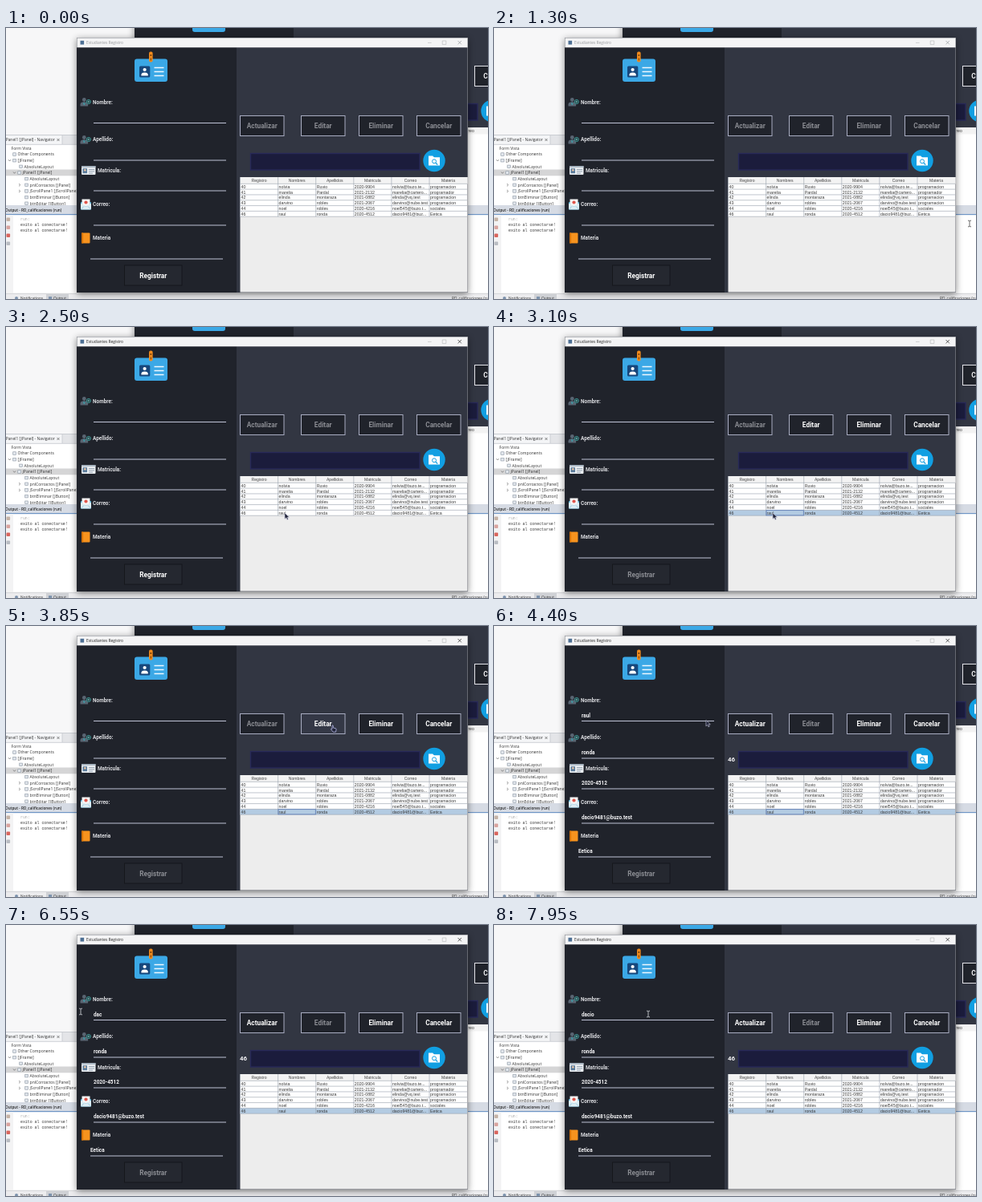
An HTML page for the animation above (8000 ms loop, 600 px wide and 338 px high).

```html
<!DOCTYPE html>
<html lang="es">
<head>
<meta charset="utf-8">
<title>Estudiantes Registro</title>
<style>
html, body { margin: 0; height: 100%; overflow: hidden; background: #f6f6f6 }
svg { display: block; width: 100vw; height: 100vh }
text { white-space: pre }
.ui { font-family: "Open Sans", "Noto Sans", sans-serif }
.form { font-family: Roboto, sans-serif; font-weight: 700 }
.table { font-family: "Liberation Sans", Arial, sans-serif }
.mono { font-family: "Liberation Mono", monospace }
.raised { filter: drop-shadow(0 2px 4px #0007) }
</style>
</head>
<body>
<svg id="stage" viewBox="0 0 600 338" preserveAspectRatio="none"></svg>
<script>
const LOOP = 8000, DARK = '#20232b', PANEL = '#323642', NAVY = '#1b1c3c', WHITE = '#f4f4f6', LINE = '#a9adc2';
const stage = document.getElementById('stage');

const rect = (x, y, w, h, fill, more = '') =>
  `<rect x="${x}" y="${y}" width="${w}" height="${h}" fill="${fill}" ${more}/>`;
const path = (d, stroke, width = 1, more = 'fill="none"') =>
  `<path d="${d}" stroke="${stroke}" stroke-width="${width}" ${more}/>`;
const disc = (x, y, r, fill, more = '') => `<circle cx="${x}" cy="${y}" r="${r}" fill="${fill}" ${more}/>`;
// y is the middle of the line
const text = (x, y, s, size, fill, kind, more = '') =>
  `<text class="${kind}" x="${x}" y="${y + size * .36}" font-size="${size}" fill="${fill}" ${more}>${s}</text>`;
const MID = 'text-anchor="middle"';

const button = (id, x, y, w, label, line = LINE, fill = DARK) => `<g id="${id}">` +
  rect(x, y, w, 25, fill, `stroke="${line}"`) + text(x + w / 2, y + 12.6, label, 8.3, WHITE, 'form', MID) + '</g>';

const search = () => rect(304.5, 156.5, 210.5, 20.5, NAVY, 'stroke="#272858" stroke-width="1.4"') +
  disc(533, 165.5, 13.7, '#119fe2') + '<g transform="translate(533 165.5)">' +
  '<path d="M-7-6h5.2l1.6 1.8H7V6H-7z" fill="#fff"/>' + path('M1.8 2.6l2.4 2.4', '#119fe2', 1.3) +
  disc(0, .8, 2.5, 'none', 'stroke="#119fe2"') + '</g>';

const badge = () =>
  rect(160, 38.5, 41, 28.5, '#3ba8e6', 'rx="3"') + rect(178, 29.5, 4.6, 13, '#f08a1c', 'rx="2"') +
  disc(180.3, 34, 1, '#6b3a0a') + path('M180.3 37.5v3', '#6b3a0a', 1) +
  rect(166, 47.5, 13.3, 14, '#17477c', 'rx="1.5"') + disc(172.6, 52, 2.1, '#fff') +
  '<path d="M168.4 59.6v-1q0-3 4.2-3t4.2 3v1z" fill="#fff"/>' +
  path('M184.5 49.5h12M184.5 54.5h12M184.5 59.5h12', '#eef8ff', 1.4);

function ide() {
  let s = rect(0, 0, 600, 338, '#f7f7f8');
  // same form behind the window
  s += '<g class="raised" transform="translate(72 -62)">' + rect(88, 24, 198, 200, DARK) + rect(286, 24, 288, 200, PANEL) +
    badge() + button('behind', 511.5, 109.5, 54.5, 'Cancelar', '#e4e4ea') + search() +
    rect(291, 186, 283, 143, '#fff') + rect(291, 186, 283, 8.4, '#f3f3f3') +
    text(503, 190.4, 'Correo', 5.1, '#444', 'table', MID) + '</g>';
  // navigator
  s += rect(0, 133, 90, 12, '#e4e5e8') + rect(0, 134, 70, 11, '#f4f5f7') +
    path('M0 133.5H88M70 134v11M0 145.3H88', '#bfc3c9', .7) +
    text(-1.6, 139.4, 'jPanel1 [JPanel] - Navigator', 4.95, '#333', 'ui') +
    path('M63.5 138l3 3m0-3l-3 3', '#555', .7) +
    rect(0, 146, 90, 75, '#fff') + rect(0, 176.5, 90, 7.8, '#d5d5d6');
  const nodes = [[7, 'Form Vista'], [15, 'Other Components'], [15, '[JFrame]'], [23, 'AbsoluteLayout'],
    [21, 'jPanel1 [JPanel]'], [30, 'AbsoluteLayout'], [30, 'pnlContactos [JPanel]'],
    [30, 'jScrollPane1 [JScrollPane]'], [30, 'btnEliminar [JButton]'], [30, 'btnEditar [JButton]']];
  nodes.forEach(([x, label], i) => {
    const y = 149.9 + i * 7.65;
    s += text(x - .4, y, label, 5.05, '#333', 'ui');
    if (i) s += rect(x - 6.3, y - 1.8, 3.8, 3.6, '#dfe4ea', 'stroke="#8e98a5" stroke-width=".6"');
    if ([2, 4].includes(i)) s += path(`M${x - 12} ${y - 1}l1.5 1.8 1.5-1.8`, '#666', .7);
    if ([6, 7].includes(i)) s += path(`M${x - 14} ${y - 1.6}l1.7 1.6-1.7 1.6`, '#666', .7);
  });
  // output
  s += rect(0, 221, 600, 12, '#d6dbe4') + rect(0, 232.2, 600, 1.2, '#5584bd') +
    rect(0, 233.4, 600, 97.3, '#fff') + rect(0, 233.4, 9, 97.3, '#f3f3f4') +
    text(-1, 227.3, 'Output - RD_calificaciones (run)', 4.65, '#222', 'ui', 'font-weight="600"') +
    ['#c5b3a6', '#d9a49f', '#d9655d', '#b9bcc2'].map((c, i) => rect(.5, 236.5 + i * 10, 4.6, 4.6, c, 'rx="1"')).join('') +
    text(18, 238.7, 'run:', 4.9, '#a9a9a9', 'mono') +
    [245.3, 252.3].map(y => text(18, y, 'exito al conectarse!', 4.9, '#333', 'mono')).join('');
  // status bar
  s += rect(0, 331, 600, 7, '#ececee') + path('M0 331.3H600', '#c6c8cc', .7) +
    rect(50, 332, 28, 6, '#cfd1d5') + disc(13, 337, 2, '#7d93ad') + rect(53, 335, 4, 4, '#7d93ad') +
    text(18, 337, 'Notifications', 4.8, '#333', 'ui') + text(59, 337, 'Output', 4.8, '#333', 'ui') +
    text(555, 337, 'RD_calificaciones (run)', 4.8, '#333', 'ui');
  return s;
}

function icons() {
  const person = y => disc(97.3, y - 3, 2.4, '#596572') +
    `<path d="M92.5 ${y + 5}v-2q0-3.2 4.8-3.2t4.8 3.2v2z" fill="#596572"/>` +
    path(`M96.3 ${y + .5}l1 3 1-3`, '#39a8b4', .8) +
    disc(102.8, y - .5, 2.6, DARK, 'stroke="#3fa3a0" stroke-width=".9"') +
    path(`M101.3 ${y - .5}h3m-1.5-1.5v3`, '#6fd0c8', .8);
  return person(92.5) + person(139.5) + badge() +
    // id card
    rect(94, 172, 17.5, 11, '#e9edf1', 'rx="1"') + rect(94, 172, 17.5, 2, '#a9b6c2') +
    rect(95.5, 175.2, 5.5, 6, '#5d7d9c') + disc(98.3, 177.3, 1.2, '#f0c9a6') +
    path('M103 176.5h7m-7 2.3h7m-7 2.3h5', '#8796a5', .8) +
    // envelope
    rect(93, 217, 13, 9.5, '#4fb3d9', 'rx="1"') + rect(94.5, 213.5, 10, 9, '#f4f4f4') +
    disc(99.5, 217.5, 2.1, '#e0574d') +
    '<path d="M93 218.5l6.5 4.5 6.5-4.5v7q0 1-1 1H94q-1 0-1-1z" fill="#dcecf3"/>' +
    path('M93.3 226l4.4-4m8 4l-4.4-4', '#79b9d3', .6) +
    // book
    rect(94, 255.5, 10.5, 13, '#f7931e', 'rx="1"') + rect(94, 255.5, 2, 13, '#d87409');
}

const rows = [
  ['40', 'nolvia', 'Ruvio', '2020-9904', 'nolvia@buzo.te...', 'programacion'],
  ['41', 'marelia', 'Pardal', '2021-2132', 'marelia@cartero...', 'programador'],
  ['42', 'elinda', 'montaraza', '2021-0882', 'elinda@vq.test', 'programacion'],
  ['43', 'darvino', 'robles', '2021-2067', 'darvino@nube.test', 'programacion'],
  ['44', 'noel', 'robles', '2020-4216', 'noel545@buzo.t...', 'sociales'],
  ['46', 'raul', 'ronda', '2020-4512', 'dacio9481@buz...', 'Eetica']];

function table() {
  const x0 = 291.5, y0 = 194.3, w = 47.1, h = 6.82, end = y0 + 6 * h;
  let s = rect(x0, 186, 283, 143.5, '#ededed') + rect(x0, 186, 283, 8.4, '#f3f3f3') +
    rect(x0, y0, 282.5, 6 * h, '#fff') +
    rect(x0, y0 + 5 * h, 282.5, h, '#b3cbe2', 'id="row"');
  ['Registro', 'Nombres', 'Apellidos', 'Matricula', 'Correo', 'Materia'].forEach((name, c) => {
    s += text(x0 + (c + .5) * w, 190.5, name, 5.1, '#444', 'table', MID) +
      path(`M${x0 + c * w} 186V${end}`, '#979fab', .6);
    rows.forEach((r, i) => s += text(x0 + 1 + c * w, y0 + (i + .52) * h, r[c], 5.25, '#3a3a3a', 'table'));
  });
  for (let i = 0; i < 7; i++) s += path(`M${x0} ${y0 + i * h}H574`, '#979fab', .6);
  return s + rect(x0 + w + .4, y0 + 5 * h + .3, w - .8, h - .6, 'none', 'id="focus" stroke="#5b7cb8" stroke-width=".8"');
}

function win() {
  let s = rect(88, 12, 487, 318, '#f4f4f5', 'class="raised"') +
    rect(88.3, 12.3, 486.4, 317.4, '#f4f4f5', 'stroke="#8d9096" stroke-width=".6"') +
    rect(92.5, 15.8, 4.6, 4.8, '#4d6f94') +
    `<g id="bar">${text(100, 18.3, 'Estudiantes Registro', 4.85, 'currentColor', 'ui')}` +
    path('M562.5 16l4.4 4.4m0-4.4l-4.4 4.4', 'currentColor', .7) + '</g>' +
    path('M525 18.4h4.6M543.2 16h4.6v4.6h-4.6z', '#b4b5b8', .6) +
    rect(88, 24.3, 199, 305.7, DARK) + rect(287, 24.3, 287.6, 305.7, PANEL) + icons();
  [[108, 92.5, 'Nombre:'], [108, 139, 'Apellido:'], [114, 177.4, 'Matricula:'], [108, 219.5, 'Correo:'], [108, 262, 'Materia']]
    .forEach(([x, y, label]) => s += text(x, y, label, 6.4, '#dcdde1', 'form'));
  [[109, 118.5], [109, 165], [109, 203], [109, 246], [105, 288]]
    .forEach(([x, y]) => s += path(`M${x} ${y}h165`, '#bfc3d6'));
  s += rect(109, 107, 0, 8.6, '#b8cfe5', 'id="mark"') + text(109, 111.5, '', 6.4, WHITE, 'form', 'id="name"') + '<g id="data">' +
    [[109, 157.5, 'ronda'], [109, 195.8, '2020-4512'], [109, 238.3, 'dacio9481@buzo.test'], [105, 280.7, 'Eetica']]
      .map(([x, y, v]) => text(x, y, v, 6.4, WHITE, 'form')).join('') +
    text(291, 166.5, '46', 7.9, WHITE, 'form') + '</g>';
  s += button('save', 147.5, 296, 71.5, 'Registrar', '#15171c', '#252830');
  [['update', 'Actualizar', 291.5], ['edit', 'Editar', 367.5], ['drop', 'Eliminar', 439.5], ['cancel', 'Cancelar', 511.5]]
    .forEach(([id, label, x]) => s += button(id, x, 109.5, 54.5, label));
  return s + search() + table();
}

const pointerSkin = 'fill="#22253a"';
const cursors = '<g id="beam">' + path('M-2-3.8h1.4l.6.6.6-.6H2M-2 3.8h1.4l.6-.6.6.6H2M0-3.4V3.4', 'currentColor', .9) + '</g>' +
  '<g id="arrow">' + path('M0 0V7.4L1.8 5.8 3 8.4 4.3 7.8 3.2 5.3H5.5Z', '#c9cce0', .6, pointerSkin) + '</g>' +
  '<g id="hand">' + path('M0 0q1-.6 1.3.4V3l3 .7q.9.3.8 1.3L4.5 8.2H1.2L-1.4 5q-.2-1 .9-.8L0 4.6Z', '#b9bbea', .8, pointerSkin) + '</g>';

stage.innerHTML = ide() + win() + cursors;
const $ = id => document.getElementById(id);
const show = (id, on) => $(id).setAttribute('visibility', on ? 'visible' : 'hidden');

// time, x, y of the pointer
const track = [[1300, 592, 244], [1550, 589, 242], [1750, 589, 242], [2400, 347, 232], [3100, 347, 232],
  [3850, 406, 124], [4050, 406, 124], [4750, 123, 111], [4800, 123, 111], [5050, 93, 108],
  [7700, 93, 108], [7950, 192, 111]];
const keys = [6000, 6350, 6550, 6750, 6900];

function pointer(t) {
  const i = track.findIndex(p => p[0] > t);
  if (i < 1) return (i ? track.at(-1) : track[0]).slice(1);
  const [a, b] = [track[i - 1], track[i]];
  let k = (t - a[0]) / (b[0] - a[0]);
  k = k * k * (3 - 2 * k);
  return [a[1] + (b[1] - a[1]) * k, a[2] + (b[2] - a[2]) * k];
}

const enable = (id, on) => $(id).lastChild.setAttribute('fill', on ? '#fff' : '#8b8d93');

function draw(t) {
  const [x, y] = pointer(t);
  const picked = t >= 2600, editing = t >= 4000, marked = t >= 4800 && t < 5500;
  const hover = picked && t < 4800 && x > 367 && x < 422 && y > 109 && y < 135;

  $('bar').setAttribute('color', t >= 2450 ? '#222' : '#96989c');
  show('row', picked);
  show('focus', picked && t < 4800);
  show('data', editing);
  enable('save', !picked);
  enable('update', editing);
  enable('edit', picked && !editing);
  enable('drop', picked);
  enable('cancel', picked);
  $('edit').firstChild.setAttribute('fill', hover && !editing ? '#343846' : DARK);

  $('name').textContent = !editing ? '' : t < 5500 ? 'raul' : 'dacio'.slice(0, keys.filter(k => t >= k).length);
  $('name').setAttribute('fill', marked && x < 114 ? '#4c5664' : WHITE);
  const left = Math.min(121, Math.max(109, x));
  $('mark').setAttribute('x', left);
  $('mark').setAttribute('width', marked ? 121 - left : 0);

  const outside = x > 575;
  const kind = outside || t >= 4650 ? 'beam' : hover ? 'hand' : 'arrow';
  for (const id of ['beam', 'arrow', 'hand']) {
    show(id, t >= 1290 && id == kind);
    $(id).setAttribute('transform', `translate(${x} ${y})`);
  }
  $('beam').setAttribute('color', outside ? '#555' : '#c9ccd2');
}

const start = performance.now();
function tick() {
  draw((performance.now() - start) % LOOP);
  requestAnimationFrame(tick);
}
tick();
</script>
</body>
</html>
```
